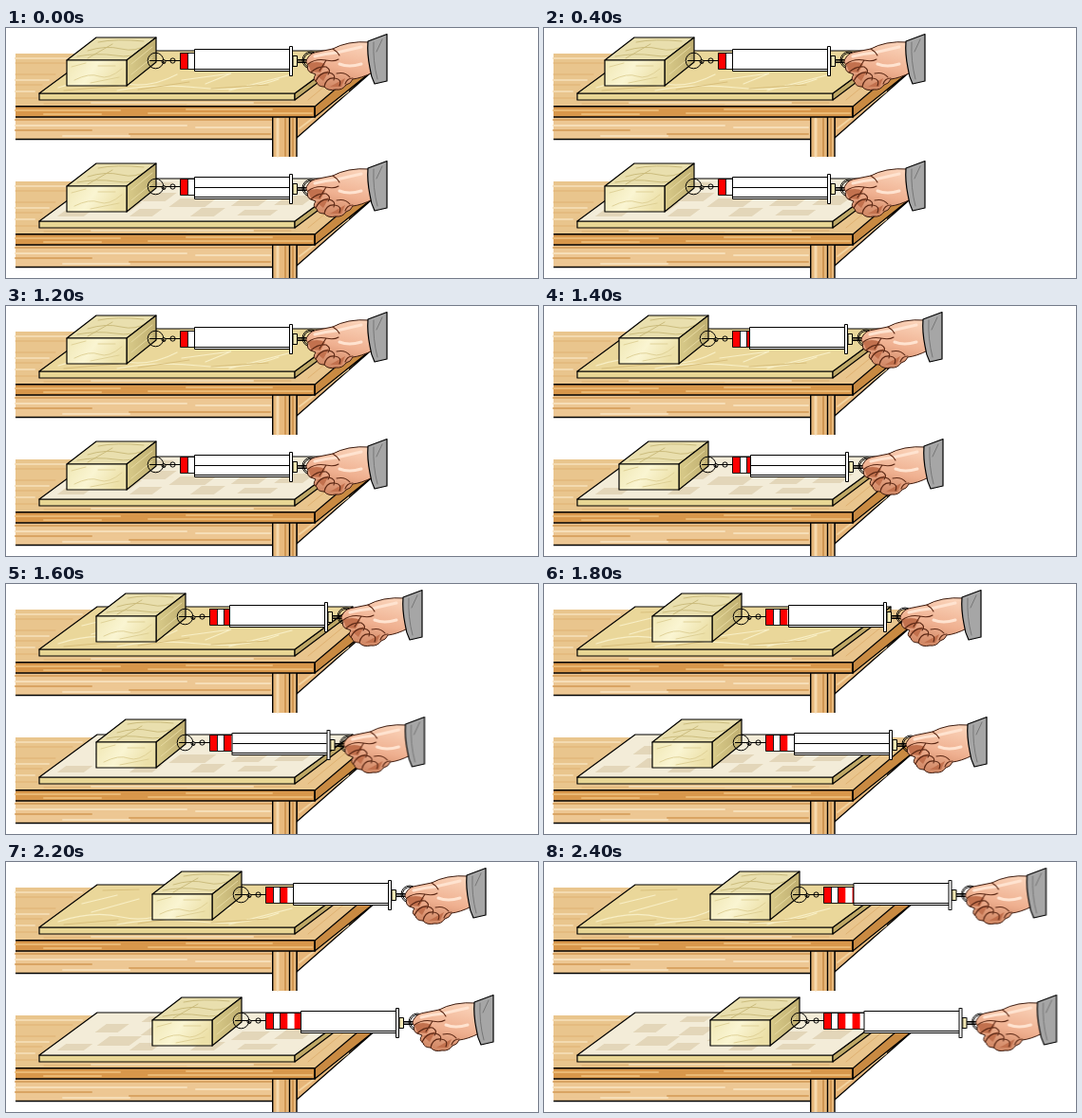
Write an HTML page without scripts that moves like this. It is 560 px wide and 264 px high and loops after 2600 ms.

```html
<!DOCTYPE html>
<html lang="en">
<head>
<meta charset="utf-8">
<title>Pulling a block along two surfaces</title>
<style>
  html, body { margin: 0; width: 100%; height: 100%; overflow: hidden; background: #fff; }
  svg { display: block; width: 560px; height: 264px; }
  .ink { stroke: #000; stroke-width: 1.2; stroke-linejoin: round; }
  .line { fill: none; stroke: #000; }
  .grain { fill: none; stroke-linecap: round; }
  .drag, .pull-a, .pull-b, .mid { animation: drag 2.6s step-end infinite; }
  .pull-a { animation-name: pull-a; }
  .pull-b { animation-name: pull-b; }
  .mid { animation-name: mid; }
  @keyframes drag {
    0% { transform: none; }
    53.846% { transform: translateX(15px); }
    61.538% { transform: translateX(31px); }
    69.231% { transform: translateX(50px); }
    76.923% { transform: translateX(68px); }
    84.615% { transform: translateX(90px); }
    92.308%, 100% { transform: translateX(111px); }
  }
  @keyframes pull-a {
    0% { transform: none; }
    53.846% { transform: translateX(18px); }
    61.538% { transform: translateX(37px); }
    69.231% { transform: translateX(59px); }
    76.923% { transform: translateX(79px); }
    84.615% { transform: translateX(104px); }
    92.308%, 100% { transform: translateX(127.5px); }
  }
  @keyframes pull-b {
    0% { transform: none; }
    53.846% { transform: translateX(19px); }
    61.538% { transform: translateX(39.5px); }
    69.231% { transform: translateX(65px); }
    76.923% { transform: translateX(86px); }
    84.615% { transform: translateX(112px); }
    92.308%, 100% { transform: translateX(138.5px); }
  }
  @keyframes mid {
    0% { opacity: 1; }
    84.615%, 100% { opacity: 0; }
  }
</style>
</head>
<body>
<svg viewBox="0 0 560 264">
  <defs>
    <linearGradient id="cream" x2="1" y2=".3">
      <stop stop-color="#f0e7b4"/><stop offset=".5" stop-color="#faf5d2"/><stop offset="1" stop-color="#ece0a8"/>
    </linearGradient>
    <linearGradient id="shade" x2="1">
      <stop stop-color="#d9cb8a"/><stop offset="1" stop-color="#bfae70"/>
    </linearGradient>
    <linearGradient id="skin" x1=".7" y1="0" x2=".4" y2="1">
      <stop stop-color="#fad2b8"/><stop offset=".55" stop-color="#efb090"/><stop offset="1" stop-color="#cf8562"/>
    </linearGradient>
    <clipPath id="sheet"><path d="M35 69L96 24H365L304 69Z"/></clipPath>

    <g id="table">
      <path fill="#e9c58d" d="M10 27H391L325 83H10Z"/>
      <g class="grain" stroke="#dfb172">
        <path d="M10 37H70M10 49H52M10 60H38M10 74H33M40 80H190M215 79H300M318 76L370 33"/>
        <path stroke="#f3dab0" stroke-width="2" d="M10 32H80M10 55H45M10 67H30M90 79H260"/>
      </g>
      <path fill="#edc793" d="M10 94H281V117H10Z"/>
      <path class="grain" stroke="#d9a463" stroke-width="2" d="M10 97H280M10 108H90M130 112H278"/>
      <path class="grain" stroke="#f6deb8" stroke-width="2" d="M10 103H190M60 114H130M200 105H278"/>
      <path class="ink" fill="#e6b578" d="M306 94H325L391 41L306 116Z"/>
      <path class="grain" stroke="#f3d3a0" stroke-width="2" d="M309 106L360 67"/>
      <path fill="#e8b97c" d="M281 94H306V136H281Z"/>
      <path class="grain" stroke="#f5d9ae" stroke-width="3" d="M286 96V135"/>
      <path class="grain" stroke="#cf9652" stroke-width="2" d="M294 96V135M302 96V135"/>
      <path class="line" stroke-width="1.4" d="M10 117.5H281M280.7 94V136M298.5 94V136M306 94V136"/>
      <path fill="#d8974b" d="M10 83H325V94H10Z"/>
      <path class="grain" stroke="#eab873" stroke-width="2" d="M10 87H120M150 90H322M40 91H100M190 86H280"/>
      <path class="ink" fill="#c98a42" d="M325 83L391 27V41L325 94Z"/>
      <path class="line" stroke-width="1.5" d="M10 82.7H325M10 94H325V83"/>
    </g>

    <g id="edges">
      <path class="ink" fill="#e8d694" d="M35 69H304V76H35Z"/>
      <path class="ink" fill="#bfa866" d="M304 69L365 24V30L304 76Z"/>
    </g>

    <g id="block">
      <path class="ink" fill="#e9dfae" d="M64 34L95 10H158L127 34Z"/>
      <path class="grain" stroke="#c8b878" stroke-width=".9" d="M75 30Q96 26 115 29T139 25M86 24Q105 18 121 22T149 17M97 15Q116 11 145 14M86 32L112 17"/>
      <path class="ink" fill="url(#shade)" d="M127 34L158 10V36L127 61Z"/>
      <path class="grain" stroke="#e6d9a0" d="M132 38L154 20M132 49L154 31"/>
      <path class="ink" fill="url(#cream)" d="M64 34H127V61H64Z"/>
      <path class="grain" stroke="#ddcf94" stroke-width=".9" d="M69 41L84 37M72 55Q88 47 98 51T122 43M89 58L119 52M97 40H115"/>
      <g class="line">
        <circle cx="157.5" cy="34.5" r="8.3"/>
        <path d="M151 34.5H164L168 37M168 34.5H183"/>
        <circle cx="166" cy="35.5" r="2"/><circle cx="175.5" cy="34.5" r="2.6"/>
      </g>
      <path fill="#fff" d="M183 26H244V43H183Z"/>
      <path fill="none" stroke="#f00" stroke-width="17" stroke-dasharray="8 7.3" d="M183 34.5H244"/>
      <path class="line" stroke-width=".9" d="M244 26.5H183.5V43.5H244M191.5 26V43M198.5 26V43"/>
    </g>

    <g id="tube">
      <path class="line" stroke="#aaa" d="M307 33.5H318M307 36.5H318"/>
      <circle class="line" stroke="#888" cx="321" cy="34" r="9"/>
      <circle class="line" stroke="#ddd" cx="321" cy="34" r="7.5"/>
      <path fill="#fff" stroke="#000" d="M198.5 22.5H298.5V45.5H198.5ZM298.5 19.5H301.5V50.5H298.5Z"/>
      <path class="line" stroke="#777" d="M199 43.5H298"/>
      <path fill="#f3e8b4" stroke="#000" d="M302 29.5H306.5V40.5H302Z"/>
      <path class="line" d="M307 35H316"/>
    </g>

    <g id="hand">
      <path fill="url(#skin)" stroke="#3b1a0e" d="M384 15Q371 14 361 16Q351 18 344 22L329 25Q321 26 318 31Q314 36 318 39Q316 45 321 47L326 49Q322 54 327 57Q328 62 335 62Q339 67 347 65Q354 66 358 60Q363 59 365 54Q374 53 386 47Z"/>
      <path fill="#c2714e" d="M318 38Q327 34 336 38L331 47L321 46ZM327 50L340 45L334 56ZM341 62L357 53L353 62Z"/>
      <path class="grain" stroke="#ffe3d0" stroke-width="3" d="M325 30Q336 27 348 26L374 20M351 38Q361 42 374 38"/>
      <path class="grain" stroke="#5a2714" stroke-width="1.1" d="M318 38Q326 32 337 34Q345 36 350 33M321 47Q328 40 337 41Q343 45 339 49M326 56Q331 46 340 47Q348 49 345 55M335 62Q337 52 346 53Q354 54 351 61M348 48Q357 46 362 52M357 59Q359 53 365 53M337 34L330 45M344 22Q349 25 351 29"/>
      <path class="ink" fill="#a6a6a6" d="M381 14L401 6.5V56L388 59Q384 51 383 42Q380 27 381 14Z"/>
      <path class="grain" stroke="#777" d="M387 15Q386 35 391 54M396 12L390 25"/>
    </g>
  </defs>

  <!-- wooden surface -->
  <use href="#table"/>
  <use href="#edges"/>
  <path class="ink" fill="#ead79a" d="M35 69L96 24H365L304 69Z"/>
  <g clip-path="url(#sheet)" class="grain" stroke="#f8efc6" stroke-width="1.2">
    <path d="M55 63Q92 51 121 58T180 49M80 44L117 35M117 66Q157 58 203 63T287 54M185 55L237 48L210 59M235 66L301 49M90 53L140 39"/>
    <path stroke="#d8bf7c" d="M61 66L118 61M139 65L193 57M216 64L276 60M102 30L140 29"/>
  </g>
  <g class="drag"><use href="#block"/></g>
  <g class="pull-a"><use href="#tube"/><use href="#hand"/></g>

  <!-- patched surface -->
  <g transform="translate(0 135)">
    <use href="#table"/>
    <use href="#edges"/>
    <path class="ink" fill="#f3ecd8" d="M35 69L96 24H365L304 69Z"/>
    <g clip-path="url(#sheet)">
      <path fill="#e3d6b9" transform="translate(35 69) skewX(-53.6)" d="M12 -12h28v7h-28zM47 -20h34v10h-34zM26 -33h24v9h-24zM88 -13h24v8h-24zM78 -30h26v9h-26zM116 -24h38v9h-38zM152 -14h25v9h-25zM180 -25h29v9h-29zM200 -12h35v6h-35zM224 -27h30v10h-30zM60 -41h26v6h-26z"/>
    </g>
  </g>
  <g transform="translate(0 133)"><g class="drag"><use href="#block"/></g></g>
  <g transform="translate(0 134)">
    <g class="pull-b">
      <use href="#tube" y="1"/>
      <path class="line mid" d="M199 34.5H298"/>
      <use href="#hand"/>
    </g>
  </g>
</svg>
</body>
</html>
```
